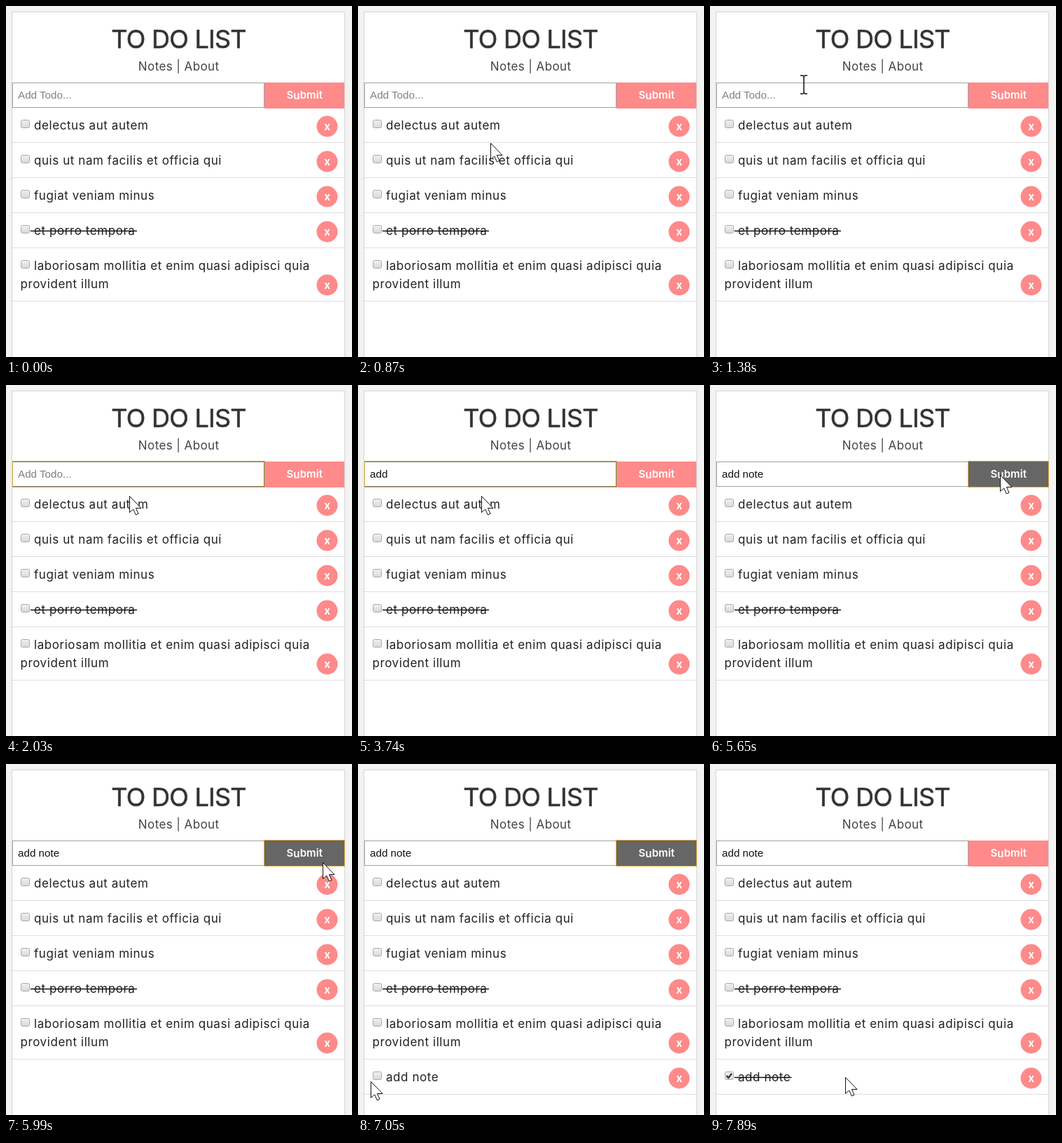
These frames come from a looping animation (494x500 px, 8 s). An HTML page:

```html
<!DOCTYPE html>
<html lang="en">
<head>
<meta charset="utf-8">
<title>To do list</title>
<style>
  html, body { margin: 0; width: 100%; height: 100%; overflow: hidden; background: #f4f4f4; }
  svg { display: block; width: 100%; height: 100%; }
  text { font-family: Inter, "Open Sans", sans-serif; white-space: pre; }
  .panel { fill: #fff; stroke: #d6d6d6; filter: drop-shadow(0 0 3px rgba(0, 0, 0, .03)); }
  .title { font-size: 36px; letter-spacing: -.7px; fill: #333; stroke: #333; stroke-width: .6; text-anchor: middle; }
  .nav { font-size: 17px; letter-spacing: .4px; fill: #444; text-anchor: middle; }
  .item { font-size: 17px; letter-spacing: .57px; fill: #222; }
  .field { font: 15.2px "Liberation Sans", Arial, sans-serif; }
  .submit { font-size: 15px; font-weight: 600; letter-spacing: .1px; fill: #fff; }
  .remove { font-size: 15px; font-weight: 700; fill: #fff; text-anchor: middle; }
  .rule { stroke: #bdbdbd; stroke-dasharray: 1 1; }
  .strike { stroke: #111; stroke-width: 1.3; }
  .box { fill: url(#boxFill); stroke: #aaa; }
  .tick { fill: none; stroke: #333; stroke-width: 2.2; }
  .ring { fill: none; stroke: #e2a93f; }
</style>
</head>
<body>
<svg viewBox="0 0 494 500">
  <defs>
    <linearGradient id="boxFill" x2="0" y2="1">
      <stop stop-color="#f0f0f0"/><stop offset="1" stop-color="#d9d9d9"/>
    </linearGradient>
  </defs>
  <rect width="494" height="500" fill="#f4f4f4"/>
  <rect class="panel" x="8.5" y="8.5" width="475" height="520"/>
  <text class="title" x="246.5" y="59.5">TO DO LIST</text>
  <text class="nav" x="246.7" y="92">Notes | About</text>

  <rect id="button" x="369" y="109" width="114" height="37"/>
  <rect id="input" x="9.5" y="109.5" width="359" height="35" fill="#fff"/>
  <rect id="inputRing" class="ring" x="9.5" y="108.5" width="360" height="37"/>
  <rect id="buttonRing" class="ring" x="368.5" y="108.5" width="115" height="37"/>
  <text id="value" class="field" x="17" y="132"></text>
  <rect id="caret" y="119" width="1" height="17" fill="#111"/>
  <text class="submit" x="400.5" y="132" dy="0 1 -1">Submit</text>

  <g id="list"></g>
  <g id="cursor">
    <path id="arrow" d="M.5 .5V23.5L5.8 19 9.3 27 13 25.3 9.4 17.5H17Z" fill="#fff" stroke="#111" stroke-linejoin="round"/>
    <path id="beam" d="M-5 -13H-1.5L0 -11.5 1.5 -13H5M0 -11.5V11.5M-5 13H-1.5L0 11.5 1.5 13H5" fill="none" stroke="#111" stroke-width="1.5"/>
  </g>
</svg>
<script>
const LOOP = 8000;
const $ = id => document.getElementById(id);
const show = (node, on) => node.setAttribute('visibility', on ? 'visible' : 'hidden');

// Each item: top of its row, lines of text, right end of the strike line.
const items = [
  { top: 145, lines: ['delectus aut autem'] },
  { top: 195, lines: ['quis ut nam facilis et officia qui'] },
  { top: 245, lines: ['fugiat veniam minus'] },
  { top: 295, lines: ['et porro tempora'], strike: 187 },
  { top: 345, lines: ['laboriosam mollitia et enim quasi adipisci quia', 'provident illum'] },
  { top: 421, lines: ['add note'], strike: 116.5, added: true }
];

function row({ top, lines, strike, added }) {
  const extra = (lines.length - 1) * 26;
  const middle = top + 26.5 + extra;
  const bottom = Math.round(top + 49.4 + extra) + .5;
  const text = lines.map((line, i) =>
    `<text class="item" x="${i ? 20.5 : 40}" y="${top + 31 + 26 * i}">${line}</text>`).join('');
  const tick = added ? `<path class="tick" d="M23.5 ${top + 23}l2.8 3 4.8-6"/>` : '';
  const line = strike ? `<path class="strike" d="M35 ${top + 25.5}H${strike}"/>` : '';
  return `<g ${added ? 'id="added"' : ''}>
    <rect class="box" x="21.5" y="${top + 17.5}" width="12" height="11" rx="2"/>
    ${text}<g ${added ? 'id="done"' : ''}>${tick}${line}</g>
    <circle cx="458.5" cy="${middle}" r="15" fill="#fe8a8a"/>
    <text class="remove" x="458.5" y="${middle + 5.3}">x</text>
    <path class="rule" d="M9 ${bottom}H483"/>
  </g>`;
}
$('list').innerHTML = items.map(row).join('');

// Pointer stops: time, x, y.
const path = [
  [380, 288, 433], [540, 260, 362], [700, 225, 275], [870, 189, 195],
  [1000, 165, 152], [1190, 140, 118], [1380, 134, 112],
  [1690, 146, 124], [1860, 165, 146], [2030, 176, 158],
  [5160, 348, 106], [5310, 385, 117], [5480, 406, 125], [5650, 414, 128],
  [5820, 428, 131], [5990, 452, 140], [6160, 440, 201],
  [6370, 370, 320], [6540, 225, 440], [6710, 95, 473], [6880, 40, 465],
  [7050, 18, 452], [7380, 24, 446], [7550, 75, 447], [7720, 150, 446], [7890, 193, 446]
];

// Typed text: time, number of letters, caret shown.
const typing = [
  [0, 0, false], [1520, 0, true], [2030, 0, false], [2570, 0, true],
  [2740, 1, true], [2920, 2, true], [3100, 3, true], [3270, 4, true],
  [3740, 4, false], [3940, 5, true], [4130, 6, true], [4470, 8, true], [5160, 8, false]
];

const latest = (steps, t) => steps.filter(step => step[0] <= t).pop();
const within = (t, from, to) => t >= from && t < to;

function drawField(t) {
  const [, count, caretOn] = latest(typing, t);
  const typed = 'add note'.slice(0, count);
  const value = $('value');
  value.textContent = typed || 'Add Todo...';
  value.setAttribute('fill', typed ? '#111' : '#808080');
  $('caret').setAttribute('x', Math.round(16.5 + (typed ? value.getComputedTextLength() : 0)));
  show($('caret'), caretOn);

  const focused = within(t, 1520, 5650);
  $('input').setAttribute('stroke', focused ? '#777' : '#a2a2a2');
  show($('inputRing'), focused);
  $('button').setAttribute('fill', within(t, 5310, 7380) ? '#666' : '#fe8a8a');
  show($('buttonRing'), within(t, 5650, 7380));
}

function drawPointer(t) {
  const stop = latest(path, t);
  show($('cursor'), stop);
  const [, x, y] = stop || [0, 0, 0];
  const overInput = within(x, 9, 369) && within(y, 109, 145);
  $('cursor').setAttribute('transform', `translate(${x} ${y})`);
  $('arrow').setAttribute('display', overInput ? 'none' : 'inline');
  $('beam').setAttribute('display', overInput ? 'inline' : 'none');
}

function draw(t) {
  drawField(t);
  drawPointer(t);
  $('added').setAttribute('display', t >= 6370 ? 'inline' : 'none');
  $('done').setAttribute('display', t >= 7380 ? 'inline' : 'none');
}

let start;
function frame(now) {
  start ??= now;
  draw((now - start) % LOOP);
  requestAnimationFrame(frame);
}
draw(0);
requestAnimationFrame(frame);
</script>
</body>
</html>
```
